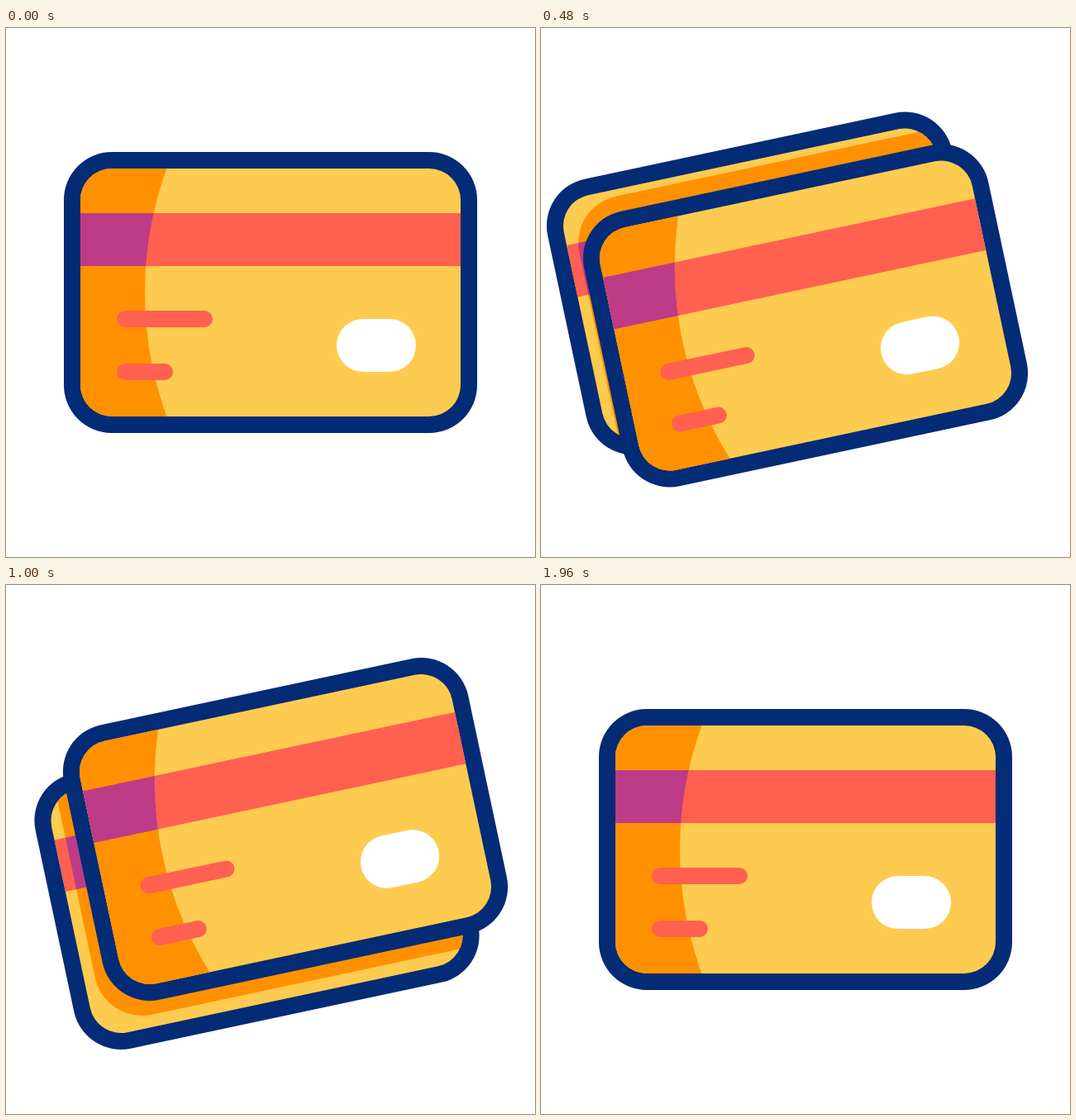
Write an HTML page with a canvas that moves like this. It is 640 px wide and 640 px high and loops after 2 s.

```html
<!DOCTYPE html>
<html lang="en">
<head>
<meta charset="utf-8">
<title>Cards</title>
<style>
html, body { margin: 0; width: 100%; height: 100%; overflow: hidden; background: #fff; }
canvas { display: block; width: 100vw; height: 100vh; }
</style>
</head>
<body>
<canvas id="stage" width="640" height="640"></canvas>
<script>
const ctx = document.getElementById('stage').getContext('2d');
const LOOP = 2000, STEP = 40;
const NAVY = '#042b75', YELLOW = '#fdcb50', ORANGE = '#ff9100';
const RED = '#ff6050', PURPLE = '#bd3b87', PALE = '#d3dcfb';

// Each track is a list of [time, value]; positions are relative to the stage centre.
const tracks = {
  angle: [[80, 0], [240, -7], [390, -12]],
  x: [[480, 0], [640, 2], [1000, 18]],
  y: [[80, 0], [240, 50], [350, 82], [480, 28], [640, -78], [720, -105], [1000, -24.5]],
  backX: [[80, 0], [240, -23], [440, -44.5], [480, -44], [640, -38], [1000, -34.5]],
  backY: [[80, 0], [240, -23], [440, -40], [480, -39], [640, -21], [1000, 59]],
  shadeX: [[80, 0], [240, -8], [480, -2], [640, 0], [1000, -12.5]],
  shadeY: [[80, 0], [240, -14], [480, -19], [640, -27], [1000, 15.7]]
};

const slope = (a, b) => (b[1] - a[1]) / (b[0] - a[0]);

function tangent(keys, i) {
  if (i === 0 || i === keys.length - 1) return 0;
  const a = slope(keys[i - 1], keys[i]), b = slope(keys[i], keys[i + 1]);
  return a * b <= 0 ? 0 : 2 * a * b / (a + b);
}

// Monotone cubic interpolation
function sample(keys, t) {
  const last = keys.length - 1;
  if (t <= keys[0][0]) return keys[0][1];
  if (t >= keys[last][0]) return keys[last][1];
  let i = 0;
  while (t > keys[i + 1][0]) i++;
  const [t0, v0] = keys[i], [t1, v1] = keys[i + 1];
  const d = t1 - t0, u = (t - t0) / d, w = u * u * (3 - 2 * u);
  return v0 * (1 - w) + v1 * w +
    d * u * (1 - u) * ((1 - u) * tangent(keys, i) - u * tangent(keys, i + 1));
}

function ease(t, from, to) {
  const u = Math.min(1, Math.max(0, (t - from) / (to - from)));
  return u * u * (3 - 2 * u);
}

function box(x, y, w, h, r, color) {
  ctx.beginPath();
  ctx.roundRect(x, y, w, h, r);
  if (color) {
    ctx.fillStyle = color;
    ctx.fill();
  }
}

function stripe(color) {
  ctx.fillStyle = color;
  ctx.fillRect(-240, -96, 480, 64);
}

function shaded() {
  ctx.clip();
  ctx.fillStyle = ORANGE;
  ctx.fillRect(-240, -160, 480, 320);
  stripe(PURPLE);
}

function card(x, y, angle, details) {
  ctx.save();
  ctx.translate(320 + x, 320 + y);
  ctx.rotate(angle * Math.PI / 180);
  box(-250, -170, 500, 340, 58, NAVY);
  box(-230, -150, 460, 300, 38, YELLOW);
  ctx.clip();
  stripe(RED);
  details();
  ctx.restore();
}

function frontDetails(swipe) {
  ctx.save();
  ctx.beginPath();
  ctx.rect(-260, -180, 520, 360);
  ctx.arc(286, 0, 438, 0, Math.PI * 2, true);
  shaded();
  ctx.restore();
  box(-186, 22, 116, 20, 10, RED);
  box(-186, 86, 68, 20, 10, RED);
  box(80, 32, 96, 64, 32, '#fff');
  if (swipe > 0) {
    const left = 245 - 290 * swipe;
    for (const y of [-96, -32]) box(left, y - 11, 320, 22, 11, PALE);
  }
}

function draw(t) {
  const home = 1 - ease(t, 1440, 1960);
  const p = {};
  for (const k in tracks) p[k] = sample(tracks[k], t) * home;
  const swipe = ease(t, 1000, 1420) * (1 - ease(t, 1460, 1760));

  ctx.fillStyle = '#fff';
  ctx.fillRect(0, 0, 640, 640);

  if (t > 80 && home > 0) {
    // Shade offset expressed in the back card's rotated space
    const a = p.angle * Math.PI / 180, c = Math.cos(a), s = Math.sin(a);
    const sx = -p.backX * c - p.backY * s + p.shadeX;
    const sy = p.backX * s - p.backY * c + p.shadeY;
    card(p.x + p.backX, p.y + p.backY, p.angle, () => {
      box(sx - 250, sy - 170, 500, 340, 58);
      shaded();
    });
  }
  card(p.x, p.y, p.angle, () => frontDetails(swipe));
}

const start = performance.now();
function tick() {
  const t = (performance.now() - start) % LOOP;
  draw(Math.floor(t / STEP) * STEP);
  requestAnimationFrame(tick);
}
tick();
</script>
</body>
</html>
```
